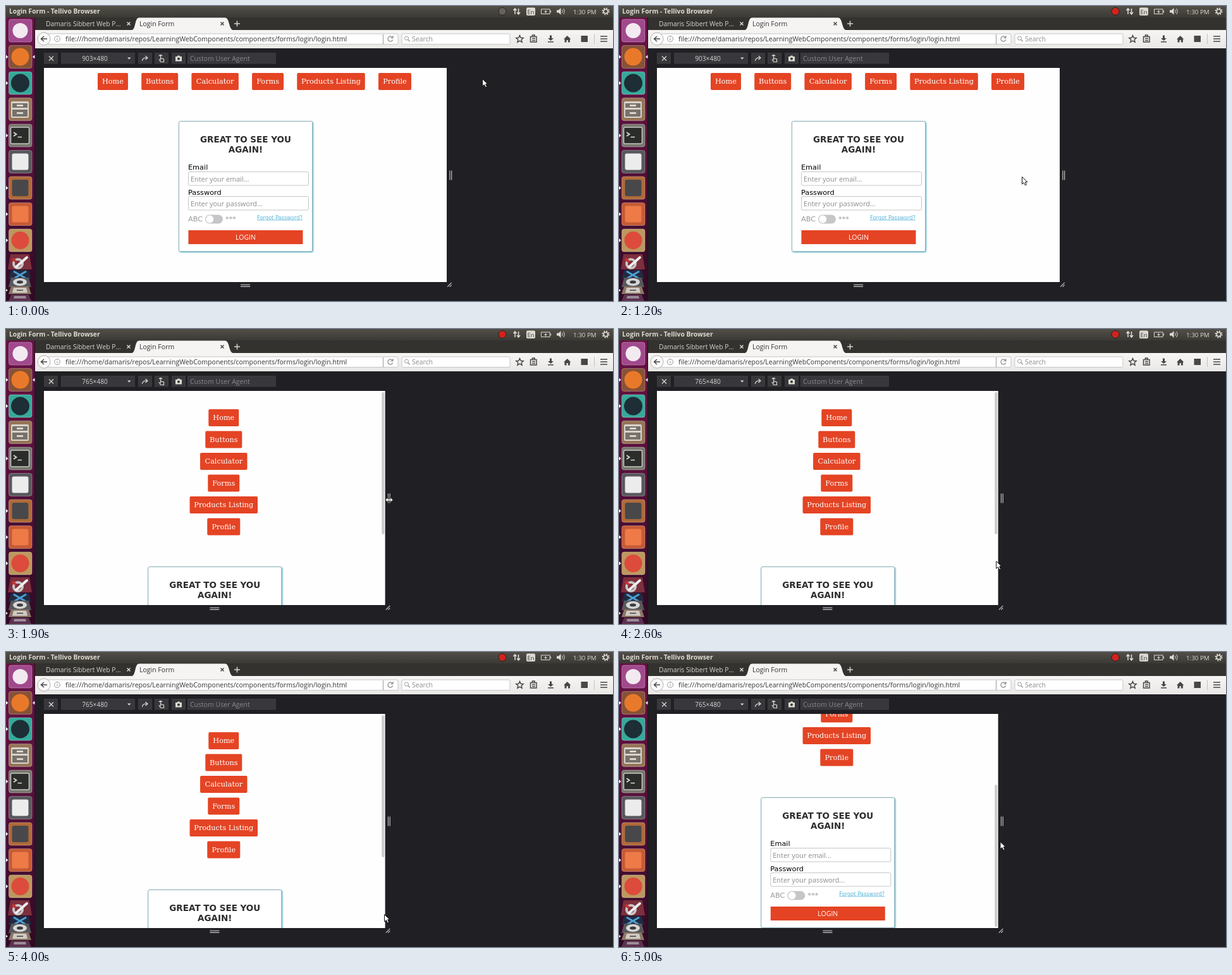
An HTML page that plays this animation: 960 by 467 pixels, repeating every 5100 ms.

```html
<!DOCTYPE html>
<html lang="en">
<head>
<meta charset="utf-8">
<title>Login Form</title>
<style>
html, body { margin: 0; height: 100%; overflow: hidden; background: #201f23; }
svg { display: block; }
#stage { width: 100vw; height: 100vh; }
text { font-family: "Open Sans", "Noto Sans", sans-serif; font-size: 10.5px; white-space: pre; }
.mid { text-anchor: middle; }
.sans { font-family: "DejaVu Sans", sans-serif; font-size: 11.29px; }
.serif { font-family: "DejaVu Serif", serif; font-size: 11.29px; fill: #fff; }
.head { font: bold 13.5px "DejaVu Sans", sans-serif; fill: #2e2e2e; }
.hint { font-size: 10.9px; fill: #8c8c8c; }
.field { fill: #fff; stroke: #c6c6c6; }
.line { fill: none; stroke: #474747; stroke-width: 1.5; }
.thin { fill: none; stroke: #9a9a9a; }
.light { fill: none; stroke: #dedbd3; }
.tool { fill: #38373b; stroke: #49484c; stroke-width: .6; }
.card { filter: drop-shadow(1.4px 1.4px 1.2px #4fb0c8); }
</style>
</head>
<body>
<svg id="stage" viewBox="0 0 960 467" preserveAspectRatio="none">
  <defs>
    <linearGradient id="panel" x2="0" y2="1"><stop stop-color="#524f48"/><stop offset="1" stop-color="#3b3a35"/></linearGradient>
    <linearGradient id="dock" x2="0" y2="1"><stop stop-color="#651343"/><stop offset=".5" stop-color="#551039"/><stop offset="1" stop-color="#2f0a24"/></linearGradient>
    <linearGradient id="bar" x2="0" y2="1"><stop stop-color="#f6f5f4"/><stop offset="1" stop-color="#eae8e6"/></linearGradient>
  </defs>

  <!-- system panel -->
  <rect width="960" height="18" fill="url(#panel)"/>
  <text x="5" y="12" font-weight="bold" style="font-size:10.27px" fill="#dfdbd2">Login Form - Tellivo Browser</text>
  <circle id="rec" cx="785" cy="8.5" r="6" stroke="#24211f"/>
  <path class="light" stroke-width="1.6" d="M805 13V4m-2.5 3L805 4l2.5 3M810.5 4v9m-2.5-3l2.5 3l2.5-3"/>
  <rect x="823" y="2.5" width="14" height="12.5" rx="2" fill="#dedbd3"/>
  <text class="mid" x="830" y="12.5" style="font-size:9.5px" fill="#3b3a35">En</text>
  <path class="light" d="M846.5 5h13.5v7.5h-13.5zM861.5 7v3.5M851 9h5m-2.5-2.5v5"/>
  <path fill="#dedbd3" d="M871 6.5h3l3.5-3.5v11l-3.5-3.5h-3z"/>
  <path class="light" d="M879.5 6q2 2.5 0 5m2-7q3.5 4.5 0 9"/>
  <text x="897" y="12.5" style="font-size:9.8px" fill="#dfdbd2">1:30 PM</text>
  <circle class="light" cx="948.5" cy="8.5" r="3.3" stroke-width="1.6"/>
  <circle class="light" cx="948.5" cy="8.5" r="5" stroke-width="2" stroke-dasharray="1.9 2.027"/>

  <!-- tabs -->
  <rect x="46" y="18" width="914" height="20.5" fill="#33322f"/>
  <path fill="#f5f4f3" d="M197 38.5C207 38.5 202 18.5 211 18.5H346C355 18.5 351 38.5 361 38.5Z"/>
  <text x="63" y="32" style="font-size:10.3px" fill="#d8d5cf">Damaris Sibbert Web P…</text>
  <text x="211" y="32" fill="#333">Login Form</text>
  <path stroke="#d8d5cf" stroke-width="1.5" d="M191.5 25.5l5 5m0-5l-5 5M361 28h9m-4.5-4.5v9"/>
  <path class="line" d="M339.5 25.5l5 5m0-5l-5 5"/>

  <!-- address bar -->
  <rect x="46" y="38" width="914" height="29" fill="url(#bar)"/>
  <rect x="64" y="44" width="556" height="16.5" rx="2" class="field"/>
  <circle cx="60" cy="52" r="10" fill="#fafafa" stroke="#b3b0ad"/>
  <path class="line" stroke-width="2" d="M65 52H56m4-4l-4.5 4l4.5 4"/>
  <circle class="thin" cx="81" cy="52" r="4.5"/>
  <path class="thin" d="M81 51v3.5m0-6v1.2M596.5 45v15"/>
  <text x="94" y="56" style="font-size:10.56px" fill="#333">file:///home/damaris/repos/LearningWebComponents/components/forms/login/login.html</text>
  <path class="thin" stroke-width="1.4" d="M611.5 50a4 4 0 1 0 .3 3.3M612 47v3.5h-3.5"/>
  <rect x="626" y="44" width="171" height="16.5" rx="2" class="field"/>
  <circle class="thin" cx="633.5" cy="51" r="3"/><path class="thin" stroke-width="1.5" d="M635.7 53.2l3 3"/>
  <text x="642" y="56" fill="#8b8b8b">Search</text>
  <path class="line" stroke-width="1.2" d="M812.5 46.5l1.7 3.7l4 .4l-3 2.7l.9 4l-3.6-2.1l-3.6 2.1l.9-4l-3-2.7l4-.4z"/>
  <path class="line" stroke-width="1.2" d="M829.5 48.5h9.5v8.5h-9.5zM832.5 48v-2h3.5v2M832 51.5h5m-5 3h5"/>
  <path fill="#474747" d="M860 46.5h3v4.5h3l-4.5 4l-4.5-4h3zM857 56h9v1.5h-9zM882 52.5l5.7-5.5l5.7 5.5h-1.5v5h-3v-3.5h-2.4v3.5h-3v-5z"/>
  <rect x="909.5" y="47" width="10.5" height="10" fill="#474747"/>
  <path stroke="#c5c2be" d="M930.5 44v16"/>
  <path class="line" stroke-width="2" d="M940 48h11m-11 4h11m-11 4h11"/>

  <!-- responsive view -->
  <rect x="46" y="67" width="914" height="400" fill="#201f23"/>
  <g class="tool">
    <rect x="60.5" y="74.5" width="21" height="16.5"/>
    <rect x="87.5" y="74.5" width="116" height="16.5"/>
    <rect x="209.5" y="74.5" width="21" height="16.5"/>
    <rect x="235.5" y="74.5" width="21" height="16.5"/>
    <rect x="262.5" y="74.5" width="21" height="16.5"/>
    <rect x="287.5" y="74.5" width="139" height="16.5"/>
  </g>
  <path class="light" stroke-width="1.2" d="M68 79.5l7 7m0-7l-7 7M215.5 87q0-5.5 8-5m-3-3l3.5 3l-3.5 3M244.5 86v-7.5M242 84l2.5 4.5h5v-4.5l-5-1.5M242 79q2.5-2.5 5 0"/>
  <path fill="#dedbd3" d="M192 81.5h5.500l-2.750 3zM268 80h2.5l1-1.5h3l1 1.5h2.5v7.5h-10z"/>
  <circle cx="273" cy="83.5" r="2" fill="#38373b"/>
  <text id="size" class="mid" x="140.5" y="87" style="font-size:10.1px" fill="#d4d4d4"></text>
  <text x="291" y="87" fill="#8a898d">Custom User Agent</text>

  <svg id="view" x="60" y="98" height="339">
    <rect width="100%" height="100%" fill="#fefefe"/>
    <g transform="translate(-60 -98)">
      <g id="page">
        <g id="nav"></g>
        <g id="form">
          <rect class="card" x="273.5" y="182.5" width="211" height="206" rx="2" fill="#fff" stroke="#8fafba"/>
          <text class="head mid" x="379" y="216">GREAT TO SEE YOU</text>
          <text class="head mid" x="379" y="232">AGAIN!</text>
          <text class="sans" x="288" y="259">Email</text>
          <rect class="field" x="288.5" y="262.5" width="190" height="21.5" rx="2"/>
          <text class="hint" x="292" y="277.5">Enter your email...</text>
          <text class="sans" x="288" y="298.5">Password</text>
          <rect class="field" x="288.5" y="301.5" width="190" height="21.5" rx="2"/>
          <text class="hint" x="292" y="316.5">Enter your password...</text>
          <text class="sans" x="288" y="341" fill="#999">ABC</text>
          <rect x="315" y="330.5" width="28" height="14" rx="7" fill="#c6c6c8"/>
          <circle cx="322.3" cy="337.5" r="6" fill="#fff"/>
          <text class="sans" x="347" y="341" fill="#999">***</text>
          <text class="sans" x="397" y="337.5" style="font-size:8.28px" fill="#56b4d8" text-decoration="underline">Forgot Password?</text>
          <rect x="288.5" y="355" width="181" height="22" fill="#e44424"/>
          <text class="mid" x="379" y="370" fill="#fff">LOGIN</text>
        </g>
      </g>
      <rect id="thumb" width="4" height="225" rx="2" fill="#cbcbcd"/>
    </g>
  </svg>
  <path id="sideGrip" stroke="#b5b5b8" stroke-width="1.3" d="M-1.3-7.5v15M1.5-7.5v15"/>
  <path id="baseGrip" stroke="#b5b5b8" stroke-width="1.3" d="M-7.5-1.3h15M-7.5 1.5h15"/>
  <path id="cornerGrip" stroke="#b5b5b8" stroke-width="1.2" d="M-3 3.5l6.5-6.5M.5 3.5l3-3"/>

  <!-- launcher -->
  <rect y="18" width="46" height="449" fill="url(#dock)"/>
  <path stroke="#2b0a20" d="M45.5 18v449"/>
  <g id="tiles"></g>
  <rect x="8" y="151" width="28" height="26" rx="2" fill="#d8d3cc"/>
  <path fill="#77716a" d="M10 164h24v11h-24zM10 154h24v7h-24z"/>
  <path stroke="#e9e5df" stroke-width="2.5" d="M17 169.5h10M17 157.5h10"/>
  <rect x="7.5" y="192" width="29" height="26" rx="2" fill="#2b2d2b" stroke="#c9c9c3" stroke-width="1.5"/>
  <path class="light" stroke-width="1.7" d="M12 200l4.5 3l-4.5 3M18.5 207.5h6.5"/>
  <g id="folded">
    <path fill="#7d2f3d" d="M7 393h30l4 24H3z"/>
    <circle cx="19" cy="408" r="7" fill="none" stroke="#c6c6c6" stroke-width="4"/>
    <path stroke="#eee" stroke-width="4" stroke-linecap="round" d="M16 413l17-15"/>
    <path stroke="#c93030" stroke-width="4" d="M10 400l6 5"/>
    <path fill="#222a40" d="M8 418h28l4 14H4z"/>
    <path stroke="#4f9fd2" stroke-width="3" d="M12 420l19 11M32 420l-19 11"/>
    <path fill="#57585c" d="M8 430h28l4 15H4z"/>
    <ellipse cx="22" cy="437" rx="11" ry="6" fill="#d7d7d7"/>
    <ellipse cx="22" cy="437" rx="5" ry="2.5" fill="#3b3b40"/>
    <path fill="#8b7766" d="M8 444h28l4 12H4z"/>
    <path fill="#cfcac3" d="M12 446h20l2 8H10z"/><path fill="#68625b" d="M17 449h10v2H17z"/>
    <path fill="#5c3150" d="M8 457h28l4 10H4z"/><path fill="#9a8c98" d="M13 459h18l1 4H12z"/>
    <path fill="#eee" d="M0 448l3 2l-3 2z"/>
  </g>

  <path id="arrow" fill="#fff" stroke="#111" stroke-linejoin="round" d="M.5.5V12l2.8-2.4L5.500 13.800l2-1L5.600 8.700H9z"/>
  <path id="resize" fill="#fff" stroke="#111" stroke-width=".8" d="M-6 .5l4-4v2.8h1.2V-5H.8V-.7H2v-2.8l4 4l-4 4V1.7H.8V6H-.8V1.7H-2v2.8z"/>
</svg>
<script>
const $ = id => document.getElementById(id);
const move = (id, x, y) => $(id).setAttribute("transform", `translate(${x} ${y})`);
const LOOP = 5100, SCALE = 0.7056, SCROLL = 146;

// launcher tiles: colour, mark shape, mark colour, running, radius
const tiles = [
  ["#a1498d", "o", "#f2eaf0", 0, 12], ["#875237", "o", "#e9792a", 1, 14],
  ["#36a99b", "o", "#1d2e36", 1, 14.5], ["#967457", "", "", 0],
  ["#77776f", "", "", 1], ["#58585d", "s", "#ececec", 0],
  ["#b06a38", "s", "#48484a", 1], ["#c55b35", "s", "#ee7a48", 1],
  ["#bd985e", "o", "#dc4b3c", 1, 14]
];
$("tiles").innerHTML = tiles.map(([bg, shape, ink, on, r], i) => {
  const y = 39 + i * 41.5;
  const mark = shape == "o" ? `<circle cx="22.5" cy="${y}" r="${r}" fill="${ink}"/>`
    : shape ? `<rect x="9.5" y="${y - 13}" width="26" height="26" rx="3" fill="${ink}"/>` : "";
  return `<rect x="4.5" y="${y - 18}" width="36.5" height="36" rx="3.5" fill="${bg}" stroke="#fff" stroke-opacity=".3"/>`
    + mark + (on ? `<path fill="#eee" d="M0 ${y - 3}l3.5 3l-3.5 3z"/>` : "");
}).join("") + '<path fill="#eee" d="M45.5 77.5l-3.5 3l3.5 3z"/>';

const links = [["Home", 48], ["Buttons", 58], ["Calculator", 74.5], ["Forms", 50], ["Products Listing", 107.5], ["Profile", 52]];
$("nav").innerHTML = links.map(([name, w]) =>
  `<g><rect x="${-w / 2}" width="${w}" height="27" rx="2" fill="#e44424"/><text class="serif mid" y="17.3">${name}</text></g>`).join("");

// keys: time, then values
const pointer = [
  [0, 753, 115], [400, 691, 274], [700, 703, 270], [900, 703, 270], [1200, 637, 270],
  [1700, 606, 270], [1900, 606, 270], [2100, 610, 285], [2400, 598, 340], [3000, 592.5, 421.5],
  [3600, 592.5, 421.5], [3700, 598, 415], [4500, 598, 415], [5000, 602.5, 300]
];
const widths = [[1200, 903], [1700, 765]];

function at(keys, t) {
  const i = keys.findIndex(k => k[0] > t);
  if (i < 0) return keys[keys.length - 1].slice(1);
  if (i == 0) return keys[0].slice(1);
  const a = keys[i - 1], b = keys[i], p = (t - a[0]) / (b[0] - a[0]);
  return a.slice(1).map((v, n) => v + (b[n + 1] - v) * p);
}

function layout(css, scroll) {
  const w = css * SCALE, mid = 60 + w / 2, stacked = css <= 768;
  $("view").setAttribute("width", w);
  $("size").textContent = Math.round(css) + "×480";
  let x = mid + 14.4 - 248;
  links.forEach(([, bw], i) => {
    const pos = stacked ? [mid + 14.4, 127 + i * 34.5] : [x + bw / 2, 106];
    $("nav").children[i].setAttribute("transform", `translate(${pos})`);
    x += bw + 21.2;
  });
  move("form", mid - 378.6, stacked ? 194 : 0);
  move("page", 0, -scroll);
  $("thumb").style.display = stacked ? "" : "none";
  move("thumb", 60 + w - 5.5, 100 + 110 * scroll / SCROLL);
  move("sideGrip", 60 + w + 6, 268);
  move("baseGrip", mid, 442.5);
  move("cornerGrip", 60 + w + 4, 441);
}

function draw(now) {
  const t = Math.floor(now % LOOP / 100) * 100;
  const p = Math.min(1, Math.max(0, (t - 4000) / 600));
  layout(at(widths, t)[0], SCROLL * (1 - (1 - p) ** 2));
  const sizing = t >= 1300 && t <= 2000;
  $("arrow").style.display = sizing ? "none" : "";
  $("resize").style.display = sizing ? "" : "none";
  move(sizing ? "resize" : "arrow", ...at(pointer, t));
  $("rec").setAttribute("fill", t < 100 ? "#65625d" : "#d3221d");
  requestAnimationFrame(draw);
}
draw(performance.now());
</script>
</body>
</html>
```
